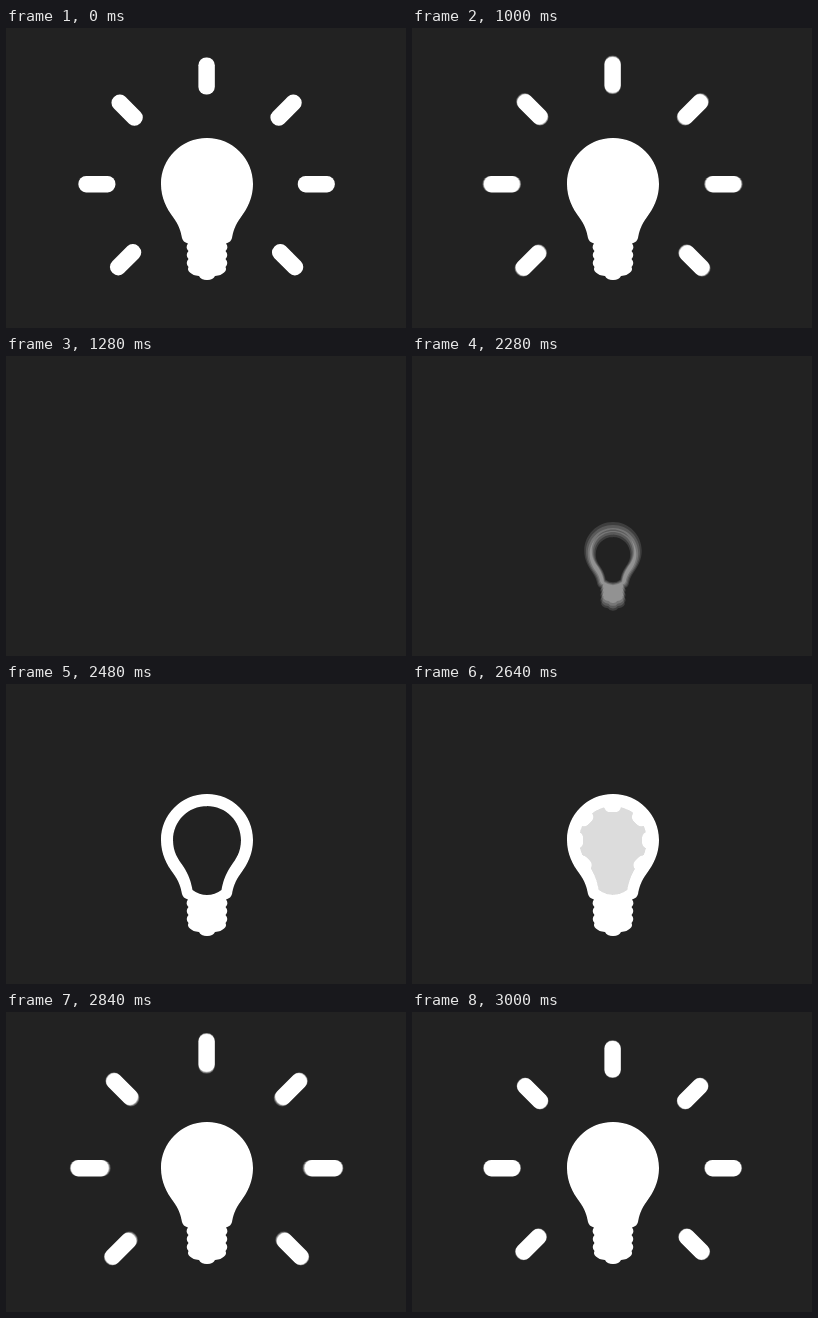
Write an HTML page with a canvas that moves like this. It is 400x300 px and loops after 3.04 s.

```html
<!DOCTYPE html>
<html lang="en">
<head>
<meta charset="utf-8">
<title>Light bulb</title>
<style>
  html, body { margin: 0; width: 100%; height: 100%; overflow: hidden; background: #222; }
  canvas { display: block; width: 100vw; height: 100vh; }
</style>
</head>
<body>
<canvas id="stage" width="400" height="300"></canvas>
<script>
const ctx = document.getElementById('stage').getContext('2d');
const LOOP = 3040, STEP = 40, SHUTTER = 22, SAMPLES = 8;
const DARK = 1500;          // a moment when nothing is visible
const CX = 201, CY = 181;   // middle of the bulb

const clamp = x => Math.min(1, Math.max(0, x));
const smooth = x => { x = clamp(x); return x * x * (3 - 2 * x); };
const backOut = u => 1 + 2.7 * (u - 1) ** 3 + 1.7 * (u - 1) ** 2;

// 1 = fully shown; falls to 0 on the way out, rises again on the way in
function phase(t, outStart, outEnd, inStart, inEnd) {
  return clamp(t < DARK
    ? (outEnd - t) / (outEnd - outStart)
    : (t - inStart) / (inEnd - inStart));
}

// Both halves of a symmetric shape, drawn around x = 0
function mirrored(d) {
  const half = new Path2D(d), path = new Path2D(half);
  path.addPath(half, new DOMMatrix([-1, 0, 0, 1, 0, 0]));
  return path;
}

const outline = 'M0 110C25.4 110 46 130.6 46 156C46 170 40 181 34 189' +
  'C28 197 26 204 25 210Q24 214 19 215.5' +
  'Q22 219.5 18.5 223Q22 227 18.5 231Q22 235 18.5 239' +
  'Q20 242 17 244.5Q14 247.5 8 248Q6 252 0 252Z';
const hole = 'M0 122C18.8 122 34 137.2 34 156C34 168 29 175 24 182' +
  'C18 191 16 198 14.5 206Q8 211 0 211Z';
const bulb = mirrored(outline), glass = mirrored(hole), shell = mirrored(outline + hole);

function drawBulb(t, weight) {
  const u = phase(t, 1160, 1265, 2254, 2465);
  if (u < 0.123) return;
  const glow = phase(t, 1200, 1250, 2530, 2660);
  const scale = backOut(u), sink = 30 * (1 - smooth((u - 0.123) / 0.55));
  ctx.save();
  ctx.translate(CX, CY + sink);
  ctx.scale(scale, scale);
  ctx.translate(0, -CY);
  ctx.globalAlpha = weight;
  if (glow === 1) {
    ctx.fill(bulb);
  } else {
    ctx.fill(shell, 'evenodd');
    ctx.globalAlpha = weight * glow;
    ctx.fill(glass);
  }
  ctx.restore();
}

function drawRays(t, weight) {
  const u = phase(t, 980, 1210, 2645, 3030);
  if (u === 0) return;
  const move = 90 * (backOut(u) - 1), stretch = 70 * (1 - u) ** 5;
  const tip = move + 18.5, tail = Math.max(move - 18.5 - stretch, -80);
  ctx.globalAlpha = weight;
  for (let i = -5; i <= 1; i++) {
    const turn = i * Math.PI / 4;
    const angle = turn - 0.035 * Math.sin(2 * turn);
    const radius = 109.7 + 1.5 * Math.sin(turn);
    ctx.save();
    ctx.translate(200.6 + radius * Math.cos(angle), 156.2 + radius * Math.sin(angle));
    ctx.rotate(turn);
    ctx.beginPath();
    ctx.roundRect(tail, -8.2, tip - tail, 16.4, 7.8);
    ctx.fill();
    ctx.restore();
  }
}

function render(t) {
  ctx.globalCompositeOperation = 'source-over';
  ctx.globalAlpha = 1;
  ctx.fillStyle = '#222';
  ctx.fillRect(0, 0, 400, 300);

  // Motion blur: additive samples that sum up to white
  ctx.globalCompositeOperation = 'lighter';
  ctx.fillStyle = '#ddd';
  for (let i = 0; i < SAMPLES; i++) {
    const time = t + ((i + 0.5) / SAMPLES - 0.5) * SHUTTER;
    drawBulb(time, 1 / SAMPLES);
    drawRays(time, 1 / SAMPLES);
  }
}

const start = performance.now();
function tick() {
  const t = (performance.now() - start) % LOOP;
  render(Math.floor(t / STEP) * STEP);
  requestAnimationFrame(tick);
}
tick();
</script>
</body>
</html>
```
